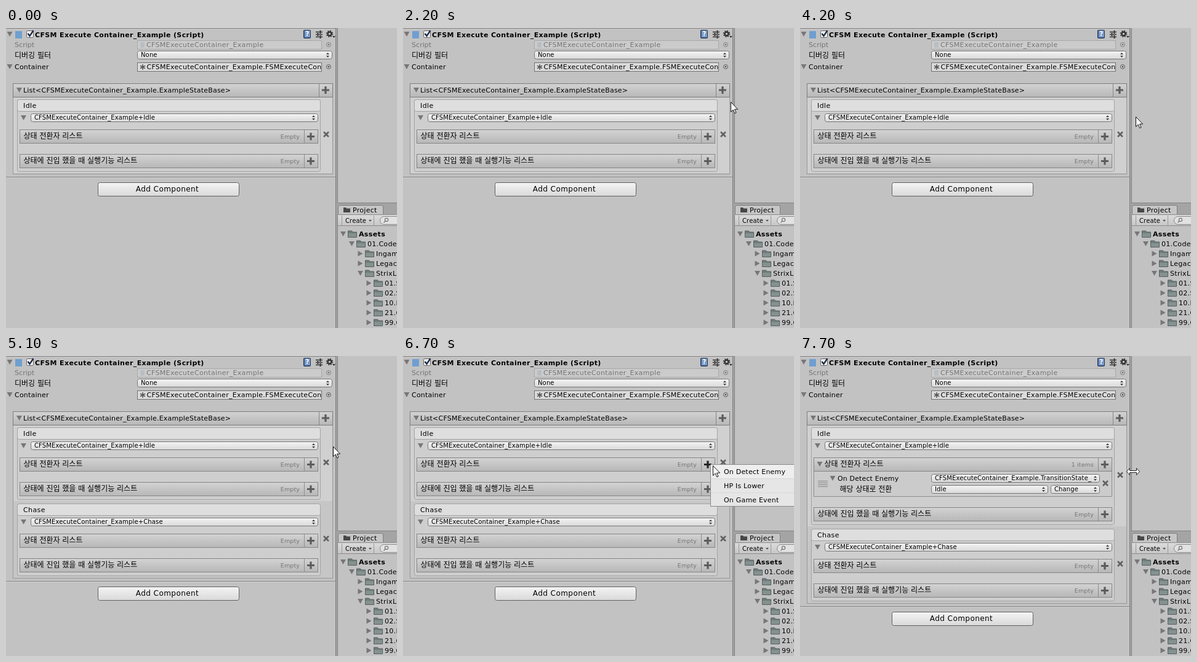
Animation of 635 by 488 pixels, one loop 8000 ms. Source, as an HTML page:

```html
<!DOCTYPE html>
<html lang="en">
<head>
<meta charset="utf-8">
<title>Inspector list</title>
<style>
  html, body { margin: 0; width: 100%; height: 100%; overflow: hidden; background: #c2c2c2; }
  svg { display: block; width: 635px; height: 488px; }
  text { font-family: "DejaVu Sans", "Noto Sans CJK KR", "Noto Sans CJK JP", sans-serif; white-space: pre; }
</style>
</head>
<body>
<svg id="stage" viewBox="0 0 635 488" xmlns="http://www.w3.org/2000/svg"></svg>
<script>
const STEP = 100, LOOP = 8000;
const ITEM_H = 124, EXTRA_H = 41;
const NAME = 'CFSMExecuteContainer_Example';
const INK = '#000', GREY = '#757575';

// Drawing helpers
const rect = (x, y, w, h, fill) => `<rect x="${x}" y="${y}" width="${w}" height="${h}" fill="${fill}"/>`;
const box = (x, y, w, h, fill, stroke, r = 0) =>
  `<rect x="${x + .5}" y="${y + .5}" width="${w - 1}" height="${h - 1}" rx="${r}" fill="${fill}" stroke="${stroke}"/>`;
const path = (d, fill, stroke = 'none', w = 1) =>
  `<path d="${d}" fill="${fill}" stroke="${stroke}" stroke-width="${w}"/>`;
const text = (x, y, s, size = 11, gap = .22, fill = INK, more = '') =>
  `<text x="${x}" y="${y}" font-size="${size}" letter-spacing="${gap}" fill="${fill}" ${more}>` +
  s.replace(/</g, '&lt;').replace(/>/g, '&gt;') + '</text>';
const label = (x, y, s) => text(x, y, s, 12, 0);
const small = (x, y, s) => text(x, y, s, 10, .14);
const bold = (x, y, s) => text(x, y, s, 11, .36, INK, 'font-weight="bold"');
const open = (x, y) => path(`M${x - 4.5} ${y - 4}h9l-4.5 8z`, '#777');
const shut = (x, y) => path(`M${x - 4} ${y - 4.5}v9l8-4.5z`, '#777');
const plus = (x, y, id = '') =>
  `<path ${id && `id="${id}"`} d="M${x - 6} ${y}h12M${x} ${y - 6}v12" stroke="#5c5c5c" stroke-width="3.2"/>`;
const cross = (x, y) => path(`M${x - 4} ${y - 4}l8 8m0-8l-8 8`, 'none', '#606060', 2.5);
const target = (x, y) =>
  `<circle cx="${x}" cy="${y}" r="3.5" fill="none" stroke="#555" stroke-width=".9"/><circle cx="${x}" cy="${y}" r="1.200" fill="#444"/>`;
const folder = (x, y) =>
  path(`M${x + .5} ${y + 5.5}v-10.500h6l1.500 2h6.500v8.500z`, '#6f7c7b', '#566160') +
  path(`M${x + 1} ${y + 5}v-6h13v6z`, '#84918f');

const popup = (x, y, w, s) =>
  box(x, y, w, 14, 'url(#pop)', '#777', 3) +
  `<svg x="${x}" y="${y}" width="${w - 13}" height="14">${small(6, 10, s)}</svg>` +
  path(`M${x + w - 10} ${y + 6}l2.500-3 2.500 3zm0 2l2.500 3 2.500-3z`, '#444');

function subList(y, title, opts = {}) {
  const full = opts.count;
  return box(22, y, 485, 23, 'url(#head)', '#858585') +
    rect(484, y + 1, 1, 21, '#8c8c8c') +
    (full ? open(32, y + 11) : '') +
    label(full ? 39.5 : 28.5, y + 15, title) +
    text(477, y + 15, full || 'Empty', 9.500, .1, GREY, 'text-anchor="end"') +
    plus(495, y + 11.500, opts.id);
}

function transition(y) {
  const grip = [0, 3, 6, 9].map(d => rect(29, y + 16 + d, 16, 1, '#858585')).join('');
  return box(22, y - 1, 485, 43, '#cbcbcb', '#8c8c8c') + grip + open(53, y + 12) +
    text(61, y + 16, 'On Detect Enemy', 11, .14) +
    popup(213, y + 5, 274, NAME + '.TransitionState_Example') +
    label(64.5, y + 34, '해당 상태로 전환') +
    popup(213, y + 23, 190, 'Idle') + popup(407, y + 23, 80, 'Change') + cross(496, y + 20);
}

function stateItem(y, name, full, id) {
  const add = full ? EXTRA_H : 0;
  return box(18, y, 493, 118 + add, '#cecece', '#a3a3a3', 3) +
    box(18, y, 493, 20, '#dedede', '#a3a3a3', 3) +
    text(28, y + 14, name, 11, .4) +
    open(28.500, y + 30) + popup(40, y + 23, 467, NAME + '+' + name) +
    (full ? transition(y + 71) : '') +
    subList(y + 49, '상태 전환자 리스트', { count: full && '1 items', id }) +
    subList(y + 89 + add, '상태에 진입 했을 때 실행기능 리스트') +
    cross(520, y + 57 + add / 2);
}

function listBody(count, full) {
  const extra = full ? EXTRA_H : 0, add = ITEM_H * (count - 1) + extra;
  const id = full ? '' : 'subPlus' + count;
  return box(11, 111, 520, 127 + add, '#c6c6c6', '#989898') +
    rect(12, 112, 518, 124 + extra, '#d0d0d0') +
    stateItem(116, 'Idle', full, id) +
    (count > 1 ? stateItem(240 + extra, 'Chase') : '') +
    rect(0, 242 + add, 535, 1, '#858585') + rect(0, 243 + add, 535, 1, '#d0d0d0') +
    box(149, 251 + add, 230, 23, 'url(#pop)', '#606060', 3) +
    text(262, 266 + add, 'Add Component', 12, .45, INK, 'text-anchor="middle"');
}

function menu(id, x, y, names) {
  const h = names.length * 23;
  const rows = names.map((s, i) =>
    rect(x + 1, y + 1 + i * 23, 140, 22, i ? '#e6e6e6' : '#eeeeee') +
    (i ? rect(x + 1, y + i * 23, 140, 1, '#d8d8d8') : '') +
    text(x + 22, y + 16 + i * 23, s, 11, .2)).join('');
  return `<g id="${id}">` + rows + box(x, y, 160, h, 'none', '#8a8a8a') + '</g>';
}

function header() {
  const field = (y, fill, stroke) => box(213, y, 300, 15, fill, stroke);
  const star = path('M222 59v9M218 61.200l8 4.600M218 65.800l8-4.600', 'none', '#555', 1.600);
  return rect(0, 0, 535, 1, '#858585') + open(6, 10) + rect(15, 5, 11, 12, '#6f9fd0') +
    box(33, 4, 12, 12, '#f0f0f0', '#646464', 2) +
    path('M35.500 9l3 4 6-9', 'none', '#1e2c48', 2.400) +
    bold(47, 15, 'CFSM Execute Container_Example (Script)') +
    box(483, 3, 12, 14, '#3f5f96', '#24364f', 1) + rect(485, 4, 9, 11, '#7c9ac8') +
    text(486.500, 13, '?', 10, 0, '#fff', 'font-weight="bold"') +
    path('M503 6.500h6M512 6.500h2M503 10.500h2M508 10.500h6M503 14.500h6M512 14.500h2', 'none', '#333', 1.500) +
    path('M510.500 4v5M506.500 8v5M510.500 12v5', 'none', '#222', 2) +
    `<circle cx="525.500" cy="9.500" r="3" fill="none" stroke="#333" stroke-width="2.400"/>` +
    `<circle cx="525.500" cy="9.500" r="4.800" fill="none" stroke="#333" stroke-width="1.800" stroke-dasharray="1.900 1.870"/>` +
    path('M530 13h5l-2.500 3z', '#333') +
    text(14, 31, 'Script', 11, .05, GREY) + field(20, '#cbcbcb', '#a9a9a9') +
    rect(218, 23, 7, 9, '#b9bec5') + text(228, 31, NAME, 11, .33, GREY) +
    `<g opacity=".65">${target(524, 27)}</g>` +
    label(14, 48.500, '디버깅 필터') + popup(213, 37, 317, 'None') +
    open(6, 63) + text(14, 67, 'Container') + field(56, '#dcdcdc', '#737373') + star +
    `<svg x="214" y="56" width="298" height="15">${text(14.500, 11, NAME + '.FSMExecuteContainer', 11, .27)}</svg>` +
    target(524, 63) +
    box(11, 90, 520, 23, 'url(#head)', '#7c7c7c') +
    `<rect id="topCell" x="509" y="91" width="21" height="21" fill="#8885"/>` +
    rect(508, 91, 1, 21, '#858585') + open(21.500, 101) +
    text(28, 105, `List<${NAME}.ExampleStateBase>`) + plus(519, 101, 'topPlus');
}

function project() {
  const rows = [[0, 'Assets', 1], [1, '01.Code', 1], [2, 'Ingame'], [2, 'Legacy'], [2, 'StrixLibrary', 1],
    [3, '01.S'], [3, '02.S'], [3, '10.F'], [3, '21.C'], [3, '99.C']];
  return rect(535, 0, 1, 488, '#7d7d7d') + rect(536, 0, 3, 488, '#a4a4a4') + rect(538, 0, 1, 488, '#828282') +
    rect(538, 284, 97, 20, '#a4a4a4') + rect(538, 284, 97, 1, '#828282') +
    path('M539.500 305v-14q0-2.500 2.500-2.500h68q2.500 0 2.500 2.500v14', '#c6c6c6', '#7d7d7d') +
    path('M548 300v-8h4l1 1.500h6v6.500z', '#474747') + text(563, 300, 'Project', 11, .3) +
    rect(539, 304, 96, 18, 'url(#bar)') + rect(539, 303, 96, 1, '#8b8b8b') + rect(539, 321, 96, 1, '#8b8b8b') +
    rect(540, 304, 72, 1, '#d2d2d2') +
    rect(545, 305, 1, 16, '#999') + rect(597, 305, 1, 16, '#999') +
    small(551, 317, 'Create') + path('M589 312h5l-2.500 3z', '#555') +
    box(607, 306, 50, 14, '#e2e2e2', '#888', 6.500) +
    `<circle cx="618" cy="312" r="2.600" fill="none" stroke="#777" stroke-width="1.200"/>` +
    path('M616 314l-2.500 2.500', 'none', '#777', 1.400) +
    rows.map(([d, s, down], i) => {
      const x = 547.500 + d * 14, y = 335 + i * 16;
      return (down ? open : shut)(x, y) + folder(x + 7.500, y) +
        (d ? text(x + 25.500, y + 4, s, 11, .3) : bold(x + 25.500, y + 4, s));
    }).join('');
}

const grad = (id, a, b) =>
  `<linearGradient id="${id}" x2="0" y2="1"><stop stop-color="${a}"/><stop offset="1" stop-color="${b}"/></linearGradient>`;

const stage = document.getElementById('stage');
stage.innerHTML =
  `<defs>${grad('head', '#d3d3d3', '#b7b7b7')}${grad('pop', '#f4f4f4', '#d9d9d9')}${grad('bar', '#dcdcdc', '#c6c6c6')}</defs>` +
  rect(0, 0, 635, 488, '#c2c2c2') +
  `<g id="body0">${listBody(1)}</g><g id="body1">${listBody(2)}</g><g id="body2">${listBody(2, true)}</g>` +
  header() +
  `<rect id="subCell" x="485" y="166" width="21" height="21" fill="#8885"/>` +
  project() +
  menu('stateMenu', 520, 104, ['Idle', 'Chase', 'Avoid', 'Patrol', 'Recovery']) +
  menu('eventMenu', 499, 176, ['On Detect Enemy', 'HP Is Lower', 'On Game Event']) +
  `<g id="arrow">${path('M.5.500V16.500l3.700-3.500 2.600 5.800 2.300-1-2.500-5.600h5z', '#fff', '#111')}</g>` +
  `<g id="resize">${path('M-10.500 0l5-5.500v4h11v-4l5 5.500-5 5.500v-4h-11v4z', '#fff', '#222')}</g>`;

// Pointer track: time, x, y
const track = [
  [200, 557, 209], [500, 437, 293], [600, 437, 293], [1200, 219, 168], [1500, 219, 168],
  [1700, 240, 177], [2200, 532, 120], [2400, 520, 104], [3000, 520, 104], [3100, 525, 112],
  [3300, 544, 144], [3700, 544, 144], [3800, 545, 144], [4500, 545, 144], [4600, 538, 148],
  [4800, 538, 148], [4900, 535, 146], [5100, 531, 147], [5300, 517, 153], [5400, 517, 153],
  [6000, 499, 176], [6600, 499, 176], [6700, 503, 178], [7100, 538, 190], [7400, 538, 190],
  [7500, 541, 188], [8000, 541, 188]
];

function pointer(t) {
  const i = Math.max(1, track.findIndex(k => k[0] >= t));
  const [t0, x0, y0] = track[i - 1], [t1, x1, y1] = track[i];
  const u = Math.max(0, (t - t0) / (t1 - t0)), e = u * u * (3 - 2 * u);
  return [x0 + (x1 - x0) * e, y0 + (y1 - y0) * e];
}

const el = id => document.getElementById(id);
const show = (id, on) => el(id).setAttribute('visibility', on ? 'visible' : 'hidden');
const tint = (id, on) => el(id).setAttribute('stroke', on ? '#222' : '#5c5c5c');

function render(ms) {
  const t = Math.floor(ms % LOOP / STEP) * STEP;
  const within = (a, b) => t >= a && t < b;
  show('body0', t < 4300);
  show('body1', within(4300, 7700));
  show('body2', t >= 7700);
  tint('topPlus', within(2400, 3200));
  tint('subPlus2', within(6000, 6800));
  show('topCell', t === 2500);
  show('subCell', t === 6100);
  show('stateMenu', within(2600, 4200));
  show('eventMenu', within(6200, 7500));
  el('stateMenu').setAttribute('opacity', t >= 4100 ? .5 : 1);
  el('eventMenu').setAttribute('opacity', t >= 7400 ? .35 : t >= 7300 ? .7 : 1);

  const wide = within(4600, 4900) || t >= 7500;
  const [x, y] = pointer(t).map(Math.round);
  show('arrow', t >= 200 && !wide);
  show('resize', wide);
  el(wide ? 'resize' : 'arrow').setAttribute('transform', `translate(${x} ${y})`);
}

const start = performance.now();
function tick() {
  render(performance.now() - start);
  requestAnimationFrame(tick);
}
tick();
</script>
</body>
</html>
```
